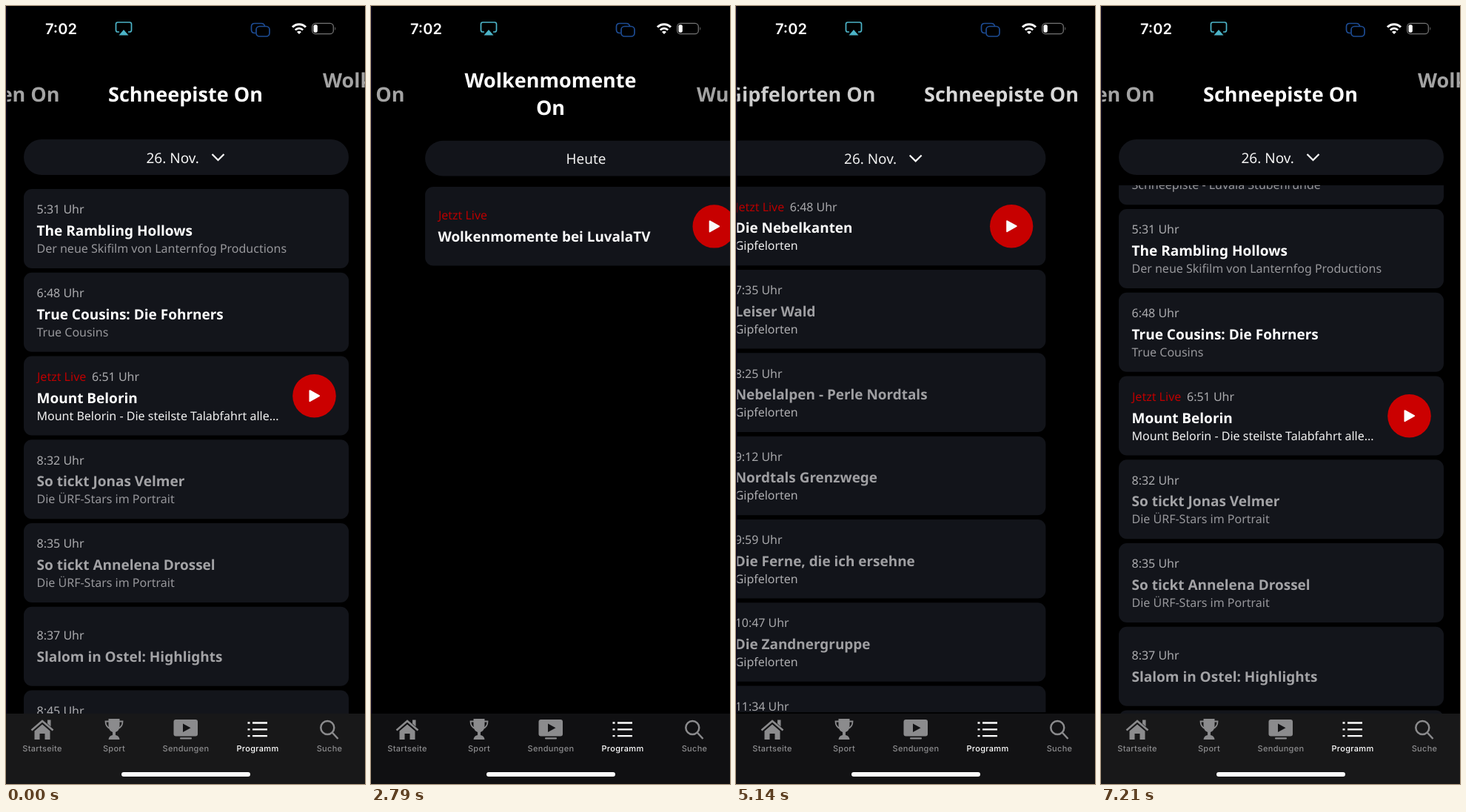
These frames come from a looping animation (485 px wide and 1050 px high, 7.93 s). An HTML page:

```html
<!DOCTYPE html>
<html lang="de">
<head>
<meta charset="utf-8">
<title>Programm</title>
<style>
  html, body { margin: 0; width: 100%; height: 100%; overflow: hidden; background: #000; }
  svg { display: block; width: 100%; height: 100%; font-family: "Noto Sans", sans-serif; text-rendering: geometricPrecision; }
  .head { font-size: 27px; font-weight: 700; fill: #fff; }
  .title { font-size: 19px; font-weight: 700; }
  .small { font-size: 16px; }
  .pill { font-size: 19px; fill: #f4f4f4; }
  .nav { font: 500 11px Inter, sans-serif; letter-spacing: .3px; text-anchor: middle; }
  .clock { font: 600 20px Inter, sans-serif; fill: #fff; }
  .mid { text-anchor: middle; }
  .end { text-anchor: end; }
</style>
</head>
<body>
<svg viewBox="0 0 485 1050" preserveAspectRatio="none">
  <defs>
    <clipPath id="list"><rect y="242" width="485" height="713"/></clipPath>
  </defs>
  <rect width="485" height="1050"/>
  <g id="pages"></g>
  <g id="heads" class="head"></g>
  <rect width="1.5" height="1050" fill="#0b071c"/>

  <g id="status" fill="none">
    <text class="clock" x="53" y="38">7:02</text>
    <path d="M153 35h-2q-2.500 0-2.500-2.500v-8q0-2.500 2.500-2.500h16q2.500 0 2.500 2.500v8q0 2.500-2.500 2.500h-2" stroke="#4cb4c8" stroke-width="1.700"/>
    <path d="M159 32l6.500 7.500h-13z" fill="#4cb4c8"/>
    <g stroke="#1d4c94" stroke-width="1.700">
      <path d="M337 36.500h-1q-4.500 0-4.500-4.500v-4q0-4.500 4.500-4.500h9q4 0 4.500 4"/>
      <rect x="338" y="27.500" width="18" height="13.500" rx="4.500"/>
    </g>
    <g stroke="#fff" stroke-width="3">
      <path d="M387 28.500a12.500 12.500 0 0 1 18 0"/>
      <path d="M390.800 32.300a7.400 7.400 0 0 1 10.400 0" stroke-width="2.600"/>
    </g>
    <path d="M393 35q3-2.400 6 0l-3 3z" fill="#fff"/>
    <rect x="413.700" y="23.300" width="28.600" height="14.400" rx="4.500" stroke="#747474" stroke-width="1.300"/>
    <path d="M444.300 28v5q2-2.500 0-5z" fill="#747474"/>
    <rect x="415.500" y="25.200" width="5.300" height="10.600" rx="2" fill="#fff"/>
  </g>

  <g id="nav" fill="#8b8b8d">
    <rect y="955" width="485" height="95" fill="#101012"/>
    <rect id="glow" y="955" width="485" height="95" fill="#fff"/>
    <path d="M34.500 977.500L49 965l14.500 12.500" fill="none" stroke="#8b8b8d" stroke-width="2.600"/>
    <path d="M56 963.500h4.500v9l-4.500-4zM38.500 978.500L49 969.500l10.500 9V990H52.500v-8h-7v8h-7z"/>
    <path d="M138.500 962h15v9q0 7-5.500 9v4q5 1 5.500 6h-15q.5-5 5.500-6v-4q-5.500-2-5.500-9z"/>
    <path d="M139 965.500h-4.500q0 8 6.500 9.500M153 965.500h4.500q0 8-6.500 9.500" fill="none" stroke="#8b8b8d" stroke-width="1.800"/>
    <rect x="226.500" y="963" width="32.500" height="22.500" rx="3"/>
    <rect x="235" y="987.300" width="16" height="2.200" rx="1"/>
    <path d="M239 968.500l10.500 5.800-10.500 5.800z" fill="#121214"/>
    <path d="M326.500 967.500h3m3.500 0h20M326.500 976.300h3m3.500 0h20M326.500 985.100h3m3.500 0h20" stroke="#fff" stroke-width="2.300"/>
    <g fill="none" stroke="#8b8b8d" stroke-width="2.500">
      <circle cx="434.300" cy="974" r="9"/><path d="M440.700 980.500l7.800 8.500"/>
    </g>
    <rect x="156" y="1034" width="174" height="6" rx="3" fill="#fff"/>
  </g>
</svg>

<script>
const LOOP = 7930, FPS = 14, WIDTH = 485, PITCH = 112.75;
const $ = id => document.getElementById(id);
const text = (cls, x, y, str, extra = '') => `<text class="${cls}" x="${x}" y="${y}" ${extra}>${str}</text>`;

// kind: 0 = over, 1 = live, 2 = upcoming
function card(top, kind, time, title, sub, subFill = '#97979b') {
  const single = title && !sub, y = top + (single ? 11 : 0);
  const live = kind === 1, fill = s => `fill="${s}"`;
  let out = `<rect x="24" y="${top}" width="439" height="107" rx="11" fill="#13151b"/>`;
  if (live) out += text('small', 42, y + 33.3, 'Jetzt Live', 'fill="#bc0000" font-weight="500"');
  out += text('small', live ? 116 : 41.5, y + 33.3, time, fill('#acacaf'));
  out += text('title', 41.5, y + 63, title, fill(kind === 2 ? '#a3a3a6' : '#fff'));
  out += text('small', 41.5, y + 86, sub, fill(live ? '#f2f2f2' : subFill));
  if (live) out += `<circle cx="416.500" cy="${top + 53.7}" r="29.300" fill="#cb0000"/>
    <path d="M410.500 ${top + 46.7}l12.500 7-12.500 7z" fill="#fff" stroke="#fff" stroke-width="2" stroke-linejoin="round"/>`;
  return out;
}

const cards = (top, rows) => rows.map((r, i) => card(top + i * PITCH, ...r)).join('');

function page(label, list) {
  const date = label === 'Heute'
    ? text('pill mid', 242.5, 211.5, label)
    : text('pill', 189.5, 211.5, label) + '<path d="M278.500 200l8 8 8-8" fill="none" stroke="#fff" stroke-width="2.200"/>';
  return `<g><rect x="24" y="180" width="439" height="48" rx="24" fill="#13151b"/>${date}
    <g clip-path="url(#list)"><g class="rows">${list}</g></g></g>`;
}

const alps = 'Gipfelorten', stars = 'Die ÜRF-Stars im Portrait', light = '#b2b2b5';
$('pages').innerHTML =
  page('26. Nov.', cards(242.5, [
    [1, '6:48 Uhr', 'Die Nebelkanten', alps],
    [2, '7:35 Uhr', 'Leiser Wald', alps, light],
    [2, '8:25 Uhr', 'Nebelalpen - Perle Nordtals', alps, light],
    [2, '9:12 Uhr', 'Nordtals Grenzwege', alps, light],
    [2, '9:59 Uhr', 'Die Ferne, die ich ersehne', alps, light],
    [2, '10:47 Uhr', 'Die Zandnergruppe', alps, light],
    [2, '11:34 Uhr', '', '']])) +
  page('26. Nov.', cards(247 - PITCH, [
    [0, '', '', 'Schneepiste - Luvala Stubenrunde'],
    [0, '5:31 Uhr', 'The Rambling Hollows', 'Der neue Skifilm von Lanternfog Productions'],
    [0, '6:48 Uhr', 'True Cousins: Die Fohrners', 'True Cousins'],
    [1, '6:51 Uhr', 'Mount Belorin', 'Mount Belorin - Die steilste Talabfahrt alle...'],
    [2, '8:32 Uhr', 'So tickt Jonas Velmer', stars],
    [2, '8:35 Uhr', 'So tickt Annelena Drossel', stars],
    [2, '8:37 Uhr', 'Slalom in Ostel: Highlights', ''],
    [2, '8:45 Uhr', '', '']])) +
  page('Heute', cards(242.5, [[1, '', 'Wolkenmomente bei LuvalaTV', '']]));

// x is relative to the middle heading
const heads = [
  ['end', -435, 'Blaukrug TV'], ['mid', -270, 'Gipfelorten On'], ['mid', 0, 'Schneepiste On'],
  ['mid', 301.5, 'Wolkenmomente', 'On'], ['', 499, 'Wunder On']];
$('heads').innerHTML = heads.map(([cls, x, a, b]) => '<g>' + (b
  ? text(cls, x, 110, a) + text(cls, x, 147, b)
  : text(cls, x, 128.5, a)) + '</g>').join('');

['Startseite', 'Sport', 'Sendungen', 'Programm', 'Suche'].forEach((s, i) =>
  $('nav').insertAdjacentHTML('beforeend', text('nav', 49 + 97 * i, 1006, s, i === 3 ? 'fill="#fff"' : '')));

// Monotone cubic curve through [time, value] points
function track(pts) {
  const slope = i => (pts[i + 1][1] - pts[i][1]) / (pts[i + 1][0] - pts[i][0]);
  const tangent = i => {
    if (i === 0 || i === pts.length - 1) return 0;
    const a = slope(i - 1), b = slope(i);
    return a * b > 0 ? 2 * a * b / (a + b) : 0;
  };
  return t => {
    const last = pts.length - 1;
    if (t <= pts[0][0]) return pts[0][1];
    if (t >= pts[last][0]) return pts[last][1];
    const i = pts.findIndex(p => p[0] > t) - 1;
    const [t0, v0] = pts[i], [t1, v1] = pts[i + 1], d = t1 - t0, k = (t - t0) / d, j = 1 - k;
    return v0 * (1 + 2 * k) * j * j + v1 * k * k * (3 - 2 * k)
      + d * k * j * (tangent(i) * j - tangent(i + 1) * k);
  };
}

// Page positions: -1 left, 0 middle, 1 right
const pageAt = track([
  [960, 0], [1290, .367], [1430, .76], [1570, .93], [1860, 1],
  [2730, 1], [2790, .901], [3000, .43], [3210, .09], [3460, 0],
  [4730, 0], [4790, -.178], [4930, -.57], [5140, -.91], [5460, -1],
  [6310, -1], [6360, -.971], [6640, -.58], [6820, -.2], [7120, 0]]);
const headAt = track([[1320, 0], [1800, 1], [2880, 1], [3430, 0], [4900, 0], [5430, -1], [6600, -1], [7100, 0]]);
const scrollAt = track([[960, 0], [1290, 11], [1430, 13.5], [4730, 13.5], [4790, 23], [4900, 27]]);

const pages = [...$('pages').children], headings = [...$('heads').children];
const middleRows = pages[1].querySelector('.rows');

function stepTime(t) {
  const n = Math.floor((t + 5) * FPS / 1000);
  return Math.round(n * 100 / FPS) * 10;
}

function draw() {
  const t = stepTime(performance.now() % LOOP), p = pageAt(t), h = headAt(t);
  pages.forEach((el, i) => {
    const u = i - 1 - p, q = u * u, alpha = 1 - 2.2 * q;
    el.style.display = alpha > 0 ? '' : 'none';
    el.style.opacity = alpha;
    el.style.filter = q > .002 ? `blur(${20 * q}px)` : 'none';
    el.setAttribute('transform', `translate(${242.5 + WIDTH * u} 552) scale(${1 - q / 2}) translate(-242.5 -552)`);
  });
  middleRows.setAttribute('transform', `translate(0 ${scrollAt(t)})`);
  $('heads').setAttribute('transform', `translate(${242.5 - h * (h < 0 ? 270 : 301.5)} 0)`);
  headings.forEach((el, i) => el.style.opacity = 1 - .36 * Math.min(1, Math.abs(i - 2 - h)));
  // A long list resting behind the bar lightens it
  $('glow').style.opacity = .03 * Math.max(0, 1 - 8 * Math.min(Math.abs(p), Math.abs(p + 1)));
  requestAnimationFrame(draw);
}
draw();
</script>
</body>
</html>
```
